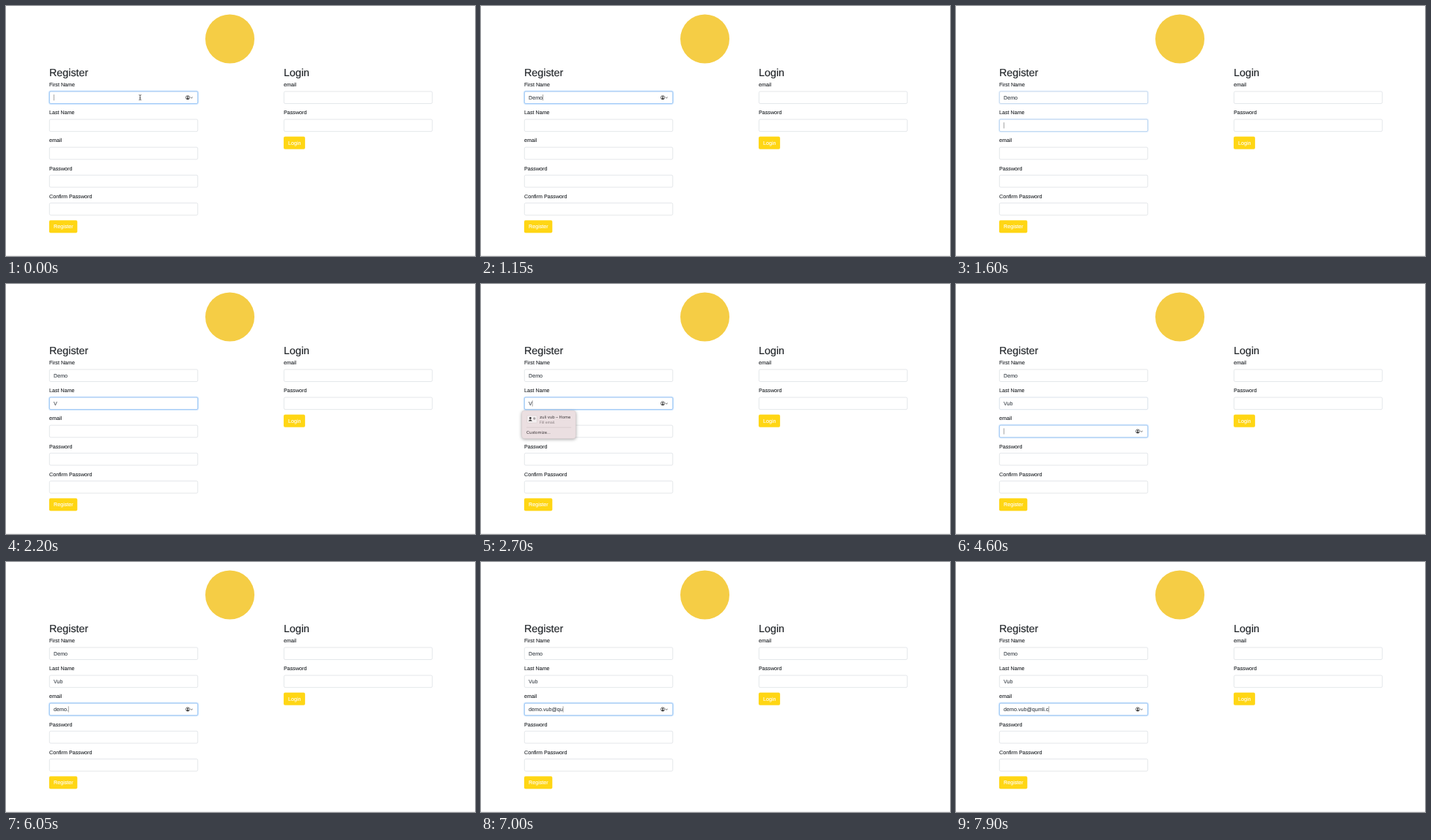
Recreate the animation shown at these times as an HTML page. Size 640 by 342 pixels, loop 8000 ms.

```html
<!DOCTYPE html>
<html lang="en">
<head>
<meta charset="utf-8">
<title>Register</title>
<style>
  html, body { margin: 0; width: 100%; height: 100%; overflow: hidden; background: #fff; }
  svg { display: block; width: 100%; height: 100%; }
  text { font: 7.16px "Liberation Sans", Arial, sans-serif; fill: #212529; stroke: #212529; stroke-width: .1; text-rendering: geometricPrecision; white-space: pre; }
  .title { font-size: 14.32px; stroke-width: .15; }
  .value { fill: #3d444b; stroke: #3d444b; }
  .onButton { fill: #fff; stroke: #fff; }
  .button { fill: #ffd614; stroke: #ffd614; stroke-opacity: .3; stroke-width: .8; }
  .box { fill: #fff; stroke: #d9dde1; stroke-width: .7; }
  .focus { fill: none; stroke: #8fc2fa; stroke-width: .8; }
  .glow { fill: none; stroke: #007bff; stroke-opacity: .16; stroke-width: 1.2; }
  #popup rect.panel { fill: #ebdfe1; stroke: #d2c6c8; stroke-width: .4; filter: drop-shadow(0 1.2px 2px rgba(0, 0, 0, .35)); }
  #popup text { font: 5.6px Inter, sans-serif; fill: #3b3538; stroke: none; }
  #popup text.small { font-size: 4.9px; fill: #80777a; }
</style>
</head>
<body>
<svg viewBox="0 0 640 342">
  <circle cx="305.5" cy="45" r="33.5" fill="#f5cd45"/>
  <path d="M0 341.5H640" stroke="#efefef"/>
  <g id="form"></g>
  <path id="caret" d="M0 -4.1V4.1" stroke="#666" stroke-width=".6"/>
  <g id="hint" fill="none" stroke="#2c2c2c" stroke-width=".7">
    <circle cx="248" r="2.6"/>
    <circle cx="248" cy="-.7" r=".95" fill="#2c2c2c" stroke="none"/>
    <path d="M246.1 1.7Q248 -.5 249.9 1.7Q248 3.2 246.1 1.7Z" fill="#2c2c2c" stroke="none"/>
    <path d="M251.8 -.6L253.3 .8L254.8 -.6"/>
  </g>
  <path id="pointer" d="M181.4 121.6Q183 121.6 183 122.6V127.6Q183 128.6 181.4 128.6M184.6 121.6Q183 121.6 183 122.6M183 127.6Q183 128.6 184.6 128.6M182.2 125.8H183.8" fill="none" stroke="#222" stroke-width=".7"/>
  <g id="popup">
    <rect class="panel" x="55.6" y="173.2" width="73.8" height="38.4" rx="4"/>
    <rect x="62.8" y="180" width="13.6" height="10" rx="1.2" fill="#f4eff0" stroke="#c9bfc1" stroke-width=".4"/>
    <circle cx="67.3" cy="183.5" r="1.4" fill="#333"/>
    <path d="M64.7 187.4Q67.3 183.6 69.9 187.4Z" fill="#333"/>
    <circle cx="72.8" cy="184" r="1.7" fill="#aaa3a5"/>
    <text x="80" y="184.1">zuli vub – Home</text>
    <text x="80" y="190.9" class="small">Fill email.</text>
    <path d="M62 196.2H123" stroke="#cbbfc2" stroke-width=".6"/>
    <text x="62" y="205.1">Customize...</text>
  </g>
</svg>
<script>
const LOOP = 8000, STEP = 38.15, FIRST_ROW = 125.2;
const $ = id => document.getElementById(id);
const rowY = row => FIRST_ROW + row * STEP;

function add(tag, attrs, content = "", parent = $("form")) {
  const el = document.createElementNS("http://www.w3.org/2000/svg", tag);
  for (const name in attrs) el.setAttribute(name, attrs[name]);
  el.textContent = content;
  return parent.appendChild(el);
}

function field(label, x, row) {
  const y = rowY(row);
  add("text", { x, y: y - 15.1 }, label);
  add("rect", { class: "box", x: x + .3, y: y - 8.3, width: 202.4, height: 16.6, rx: 1.8 });
  const focus = add("g", { opacity: 0 });
  add("rect", { class: "glow", x: x - .5, y: y - 9.1, width: 204, height: 18.2, rx: 2.5 }, "", focus);
  add("rect", { class: "focus", x: x + .3, y: y - 8.3, width: 202.4, height: 16.6, rx: 1.8 }, "", focus);
  return { focus, value: add("text", { class: "value", x: x + 6, y: y + 2.5 }) };
}

function panel(title, x, labels, buttonWidth) {
  add("text", { class: "title", x, y: 95.6 }, title);
  const fields = labels.map((label, row) => field(label, x, row));
  const y = rowY(labels.length) - 14.2;
  add("rect", { class: "button", x, y: y - 8.5, width: buttonWidth, height: 17, rx: 1.8 });
  add("text", { class: "onButton", x: x + 6, y: y + 2.5 }, title);
  return fields;
}

const fields = panel("Register", 59, ["First Name", "Last Name", "email", "Password", "Confirm Password"], 38.2);
panel("Login", 379, ["email", "Password"], 29);

// Each keystroke time reveals one more character.
const typing = [
  ["Demo", [100, 500, 800, 1150]],
  ["Vub", [2150, 3750, 4250]],
  ["demo.vub@qumli.c", [5050, 5400, 5600, 5700, 6050, 6250, 6300, 6350, 6550, 6800, 7000, 7150, 7200, 7600, 7650, 7900]]
];

const between = (t, from, to) => t >= from && t < to;
const ramp = (t, from, to) => Math.min(1, Math.max(0, (t - from) / (to - from)));
const show = (id, visible) => $(id).setAttribute("visibility", visible ? "visible" : "hidden");

function draw(now) {
  const t = now % LOOP;
  const row = t < 1550 ? 0 : t < 4550 ? 1 : 2;
  const toLast = ramp(t, 1530, 1650), toEmail = ramp(t, 4520, 4610);

  typing.forEach(([text, times], i) => {
    fields[i].value.textContent = text.slice(0, times.filter(time => t >= time).length);
    fields[i].focus.setAttribute("opacity", [1 - toLast, toLast - toEmail, toEmail][i]);
  });

  const { value } = fields[row];
  const caretX = 65.4 + (value.textContent ? value.getComputedTextLength() : 0);
  $("caret").setAttribute("transform", `translate(${caretX} ${rowY(row)})`);
  $("hint").setAttribute("transform", `translate(0 ${rowY(row)})`);

  show("caret", !between(t, 2050, 2700) && !between(t, 3200, 3750));
  show("hint", row !== 1 || between(t, 2700, 4400));
  show("popup", between(t, 2700, 4400));
  show("pointer", t < 100);
}

function tick() {
  draw(performance.now());
  requestAnimationFrame(tick);
}
tick();
</script>
</body>
</html>
```
